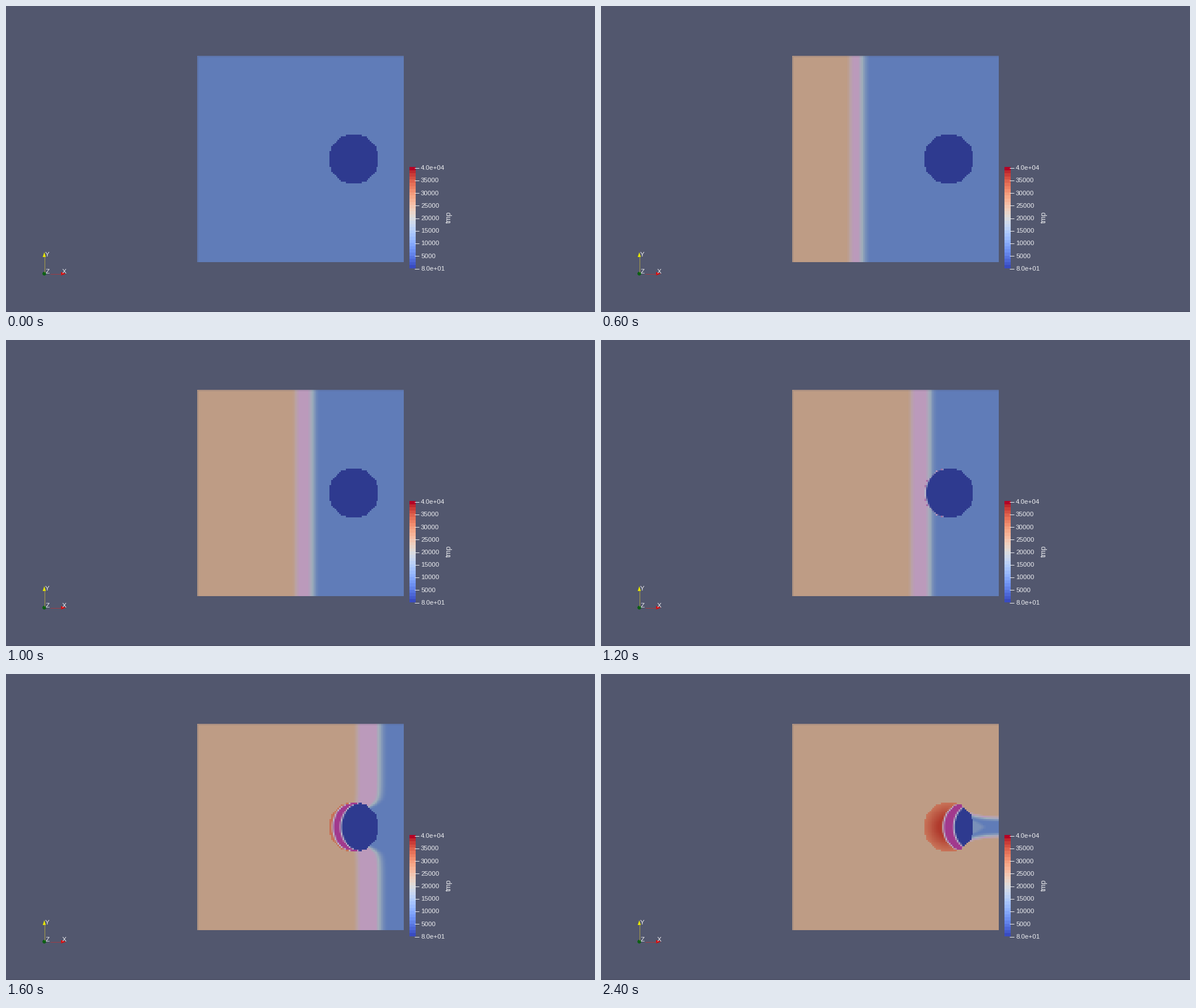
These frames come from a looping animation (1038x540 px, 2600 ms). A matplotlib script:

```python
import numpy as np
import matplotlib.pyplot as plt
from matplotlib.animation import FuncAnimation
from matplotlib.patches import Circle, Polygon, Rectangle

W, H, DPI = 1038, 540, 100
FRAMES, INTERVAL = 13, 200
LEFT, TOP, SIZE, CELLS = 337, 88, 364, 128
STEP = SIZE / CELLS
CX, CY, R = LEFT + 97 * STEP, TOP + 64 * STEP, 15.48 * STEP

BACK = "#52576e"
INK = "#ecedf0"
DARK = np.array([46, 58, 143])
MAGENTA = np.array([161, 57, 141])
ORANGE = np.array([201, 118, 90])
RED = np.array([176, 57, 44])
RIM = np.array([185, 183, 203])

# Cold, teal, pink, beige, hot
RAMP = np.array([(96, 124, 184), (161, 176, 187), (187, 154, 187),
                 (186, 164, 164), (190, 156, 133)])


def unit(v):
    return np.clip(v, 0, 1)


def mix(a, b, t):
    t = t[..., None]
    return a * (1 - t) + b * t


def ramp(level):
    return np.stack([np.interp(level, range(5), c) for c in RAMP.T], axis=-1)


axis = (np.arange(CELLS) + 0.5) * STEP
x, y = np.meshgrid(LEFT + axis, TOP + axis)
d = np.abs(y - CY)
radius = np.hypot(x - CX, y - CY)
disc = radius < R

# The wave lags close to the disc and is capped in its shadow
ease = unit((x - 600) / 50)
lag = 15 * np.exp((38 - d) / 8) * ease**2 * (3 - 2 * ease)
reach = np.where(x > CX, np.minimum(x + lag, np.maximum(x, 728)), x)
half = 19 + 13 * np.exp(-np.maximum(x - 640, 0) / 20)
cap = np.where(x > 632, 4 * (1 - unit((half - d) / 14)) ** 3, 4)
glow = np.clip(1 - (x - 656) / 25 - d / 16, 0, 0.4)

# Melting fronts keep the bent outline of the disc
core = 0.94 * R
bend = 0.8 * (core - np.sqrt(np.maximum(core**2 - d**2, 0)))
reds = mix(ORANGE, RED, unit((R - radius) / 26))


def wave(n):
    hot, front = 325 + 36 * n, 335 + 39.6 * n
    fall = 1 - (1 - unit((reach - front) / 22)) ** 2
    level = 4 - 2 * unit((reach - hot) / 12) - 2 * fall
    level = np.minimum(level, cap) * (n > 0)
    return np.maximum(level, glow * (n > 10))


def inside(n):
    m = n - 6
    if m < 0:
        return np.broadcast_to(DARK, x.shape + (3,))
    melt_x = min(571.5 + 6 * m + 1.63 * m * m, 622)
    burn_x = min(572.3 + 0.87 * m * m, melt_x - 8)
    melt, burn = melt_x + bend - x, burn_x + bend - x
    rgb = mix(DARK, MAGENTA, 1.0 * (melt > 0))
    rgb = mix(rgb, reds, 1.0 * (burn > 0))
    return mix(rgb, RIM, unit(1 - np.minimum(abs(melt), abs(burn)) / 2.8))


def field(n):
    return np.where(disc[..., None], inside(n), ramp(wave(n))) / 255


fig = plt.figure(figsize=(W / DPI, H / DPI), dpi=DPI, facecolor=BACK)
ax = fig.add_axes([0, 0, 1, 1])
ax.axis("off")


def label(px, py, text, size=11.5, **kw):
    kw = {"ha": "left", "va": "center_baseline", **kw}
    ax.text(px, py, text, color=INK, fontsize=size * 72 / DPI,
            family="Liberation Sans", **kw)


def line(xs, ys, color, width):
    ax.plot(xs, ys, color=color, lw=width * 72 / DPI, solid_capstyle="butt")


def color_bar():
    ax.imshow(np.linspace(1, 0, 32)[:, None], cmap="coolwarm",
              extent=(711, 722, 463.5, 285), aspect="auto", interpolation="nearest")
    names = ["4.0e+04", *map(str, range(35000, 0, -5000)), "8.0e+01"]
    for name, py in zip(names, np.linspace(285.5, 463.5, len(names))):
        line([719.5, 727.5], [py, py], INK, 1)
        label(731, py - 0.5, name)
    label(781, 373, "tmp", 12.3, ha="center", va="center", rotation=90)


def triad():
    line([67.5, 67.5], [470, 442], "#a39a4a", 1.1)
    line([78, 98], [472.5, 472.5], "#9c3c44", 1)
    ax.add_patch(Polygon([(67.5, 434.5), (64.7, 443), (70.3, 443)], color="#e6e600", lw=0))
    ax.add_patch(Polygon([(105.5, 472.5), (97, 469.5), (97, 475.5)], color="#dc0a0a", lw=0))
    ax.add_patch(Circle((67.5, 472.3), 3.3, color="#0c5f14", lw=0))
    for name, px, py in (("Y", 72.3, 438.5), ("Z", 73, 467.8), ("X", 102.5, 468.3)):
        label(px, py, name, ha="center")


picture = ax.imshow(field(0), extent=(LEFT, LEFT + SIZE, TOP + SIZE, TOP),
                    aspect="auto", interpolation="nearest")
ax.add_patch(Rectangle((LEFT + 0.5, TOP + 0.5), SIZE - 1, SIZE - 1, fill=False,
                       ec=BACK, alpha=0.3, lw=72 / DPI))
color_bar()
triad()
line([0, W], [539.3, 539.3], "#4a4e63", 1.4)
ax.set_xlim(0, W)
ax.set_ylim(H, 0)


def update(n):
    picture.set_data(field(n))
    return [picture]


anim = FuncAnimation(fig, update, frames=FRAMES, interval=INTERVAL,
                     repeat=True, repeat_delay=0, blit=False)
plt.show()
```
